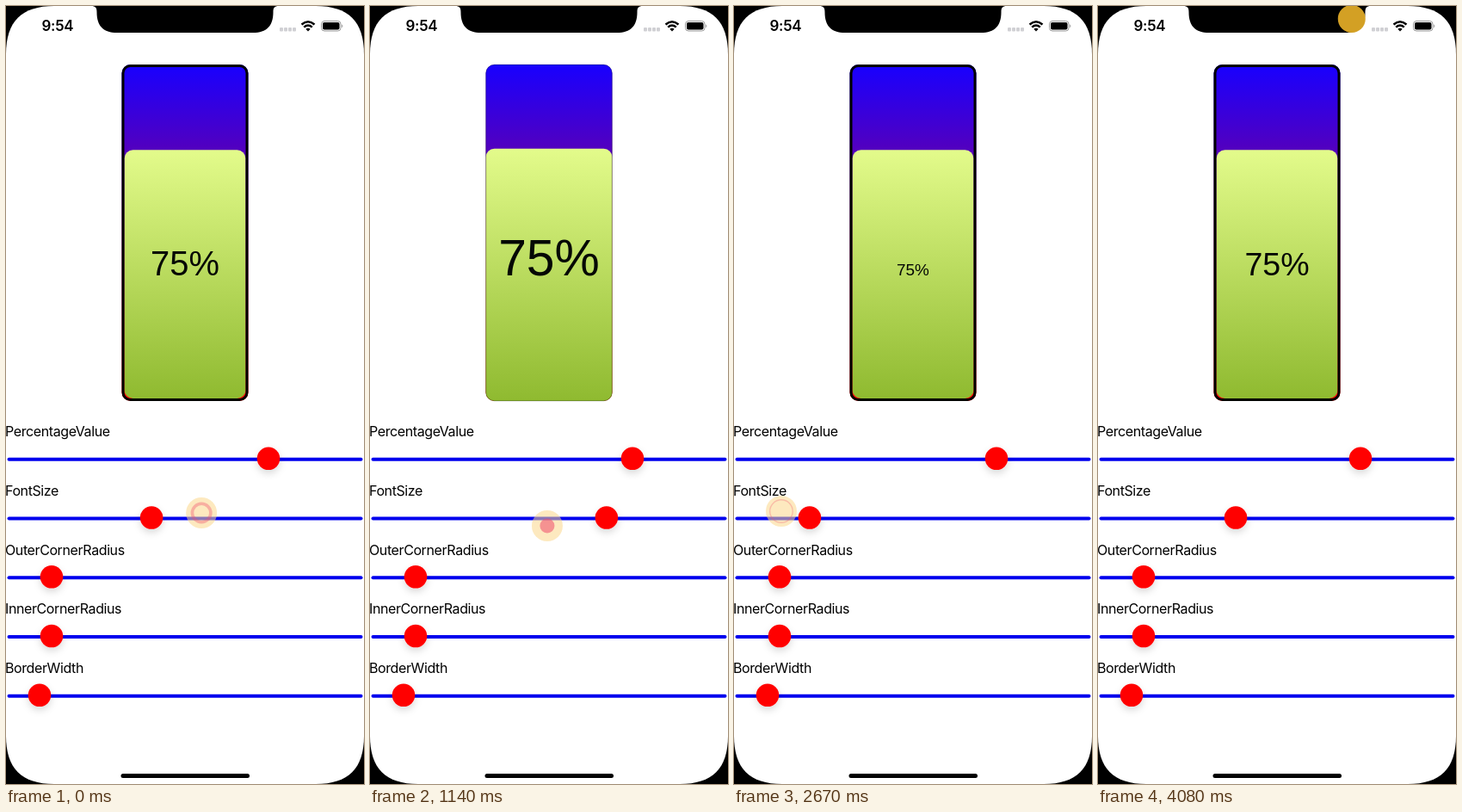
An HTML page that plays this animation: 416 by 904 pixels, repeating every 4.11 s.

```html
<!DOCTYPE html>
<html lang="en">
<head>
<meta charset="utf-8">
<title>Percentage view</title>
<style>
  html, body { margin: 0; width: 100%; height: 100%; overflow: hidden; background: #000; }
  svg { display: block; width: 100vw; height: 100vh; }
  .label { font: 16px Inter, sans-serif; letter-spacing: -.4px; }
  .clock { font: 600 17px Inter, sans-serif; letter-spacing: -.3px; }
  #value { font-family: "Liberation Sans", Arial, sans-serif; text-anchor: middle; fill: #050805; }
</style>
</head>
<body>
<svg viewBox="0 0 416 904" preserveAspectRatio="none">
  <defs>
    <linearGradient id="back" x1="0" y1="0" x2="0" y2="1">
      <stop stop-color="#1800ff"/><stop offset="1" stop-color="#f00"/>
    </linearGradient>
    <linearGradient id="front" x1="0" y1="0" x2="0" y2="1">
      <stop stop-color="#e3fb8b"/><stop offset="1" stop-color="#8fba30"/>
    </linearGradient>
    <filter id="shadow" x="-60%" y="-60%" width="220%" height="240%">
      <feDropShadow dx="0" dy="4" stdDeviation="4" flood-color="#000" flood-opacity=".15"/>
    </filter>
  </defs>

  <rect width="416" height="904"/>
  <path fill="#fff" d="M56 0H360C398 0 416 18 416 56V848C416 886 398 904 360 904H56C18 904 0 886 0 848V56C0 18 18 0 56 0Z"/>
  <path d="M99 0C104 0 105.500 2 105.500 7C105.500 23 113 31 129 31H287C303 31 310.500 23 310.500 7C310.500 2 312 0 317 0Z"/>
  <rect x="133.500" y="892" width="149.500" height="5" rx="2.500"/>

  <text class="clock" x="41.500" y="29">9:54</text>
  <g fill="#d0d0d4">
    <rect x="318" y="25" width="4" height="4.500" rx="1"/>
    <rect x="323" y="25" width="4" height="4.500" rx="1"/>
    <rect x="328" y="25" width="4" height="4.500" rx="1"/>
    <rect x="333" y="25" width="4" height="4.500" rx="1"/>
  </g>
  <g fill="none" stroke="#000" stroke-width="2.400">
    <path d="M343.500 21.500Q351 14.800 358.500 21.500"/>
    <path d="M346.200 24.600Q351 20.400 355.800 24.600"/>
  </g>
  <path d="M348.300 26.800Q351 24.600 353.700 26.800L351 29.600Z"/>
  <rect x="366.500" y="17.500" width="22.500" height="11.500" rx="3.500" fill="none" stroke="#999"/>
  <rect x="368" y="19" width="19.500" height="8.500" rx="2"/>
  <path d="M390.300 21.300Q392.300 23.200 390.300 25.200Z" fill="#888"/>

  <rect x="134.500" y="68" width="147" height="391" rx="10" fill="url(#back)"/>
  <rect id="level" rx="10" fill="url(#front)"/>
  <rect id="border" fill="none" stroke="#000"/>
  <text id="value" x="208" y="312.500">75%</text>

  <g id="sliders"></g>

  <g id="touch">
    <circle id="halo" r="18"/>
    <circle id="ripple" fill="none" stroke="#f0506e"/>
  </g>
</svg>
<script>
const LOOP = 4110, LAG = 465;
const RECT = { x: 134.5, y: 68, w: 147, h: 391 };
const $ = id => document.getElementById(id);
const set = (el, attrs) => { for (const k in attrs) el.setAttribute(k, attrs[k]); };
const add = (parent, tag, attrs) => {
  const el = document.createElementNS("http://www.w3.org/2000/svg", tag);
  set(el, attrs);
  return parent.appendChild(el);
};

const thumbs = [
  ["PercentageValue", 305], ["FontSize", 169], ["OuterCornerRadius", 53],
  ["InnerCornerRadius", 53], ["BorderWidth", 39]
].map(([name, x], i) => {
  const y = 526.8 + i * 68.75, g = $("sliders");
  add(g, "text", { class: "label", x: -1, y: y - 26.6 }).textContent = name;
  add(g, "rect", { x: 1.5, y: y - 2, width: 413, height: 4, rx: 2, fill: "#0000ee" });
  return add(g, "circle", { cx: x, cy: y - 1, r: 13.3, fill: "#f00", filter: "url(#shadow)" });
});

// Finger path: time, x, y. The font slider follows its x with a fixed lag.
const path = [
  [-465, 169, 589], [-45, 219, 589], [0, 227, 589], [420, 281, 597], [545, 292, 599],
  [675, 275, 601], [1140, 206, 604], [1575, 185, 594], [2040, 98, 581], [2205, 88, 582],
  [2670, 55, 587], [2760, 52, 588], [3225, 138, 592], [3615, 160, 594], [3690, 162, 594],
  [3750, 190, 575], [3840, 335, 350], [3930, 365, 195], [4080, 295, 15], [4110, 290, 13]
];

// Monotone cubic interpolation: extrema stay at the keys.
const rise = (i, c) => (path[i + 1][c] - path[i][c]) / (path[i + 1][0] - path[i][0]);
function slope(i, c) {
  if (i === 0) return rise(0, c);
  if (i === path.length - 1) return rise(i - 1, c);
  const a = rise(i - 1, c), b = rise(i, c);
  return a * b <= 0 ? 0 : 2 * a * b / (a + b);
}
function track(t, c) {
  let i = 0;
  while (i < path.length - 2 && t >= path[i + 1][0]) i++;
  const h = path[i + 1][0] - path[i][0], u = (t - path[i][0]) / h, v = 1 - u;
  return v * v * (1 + 2 * u) * path[i][c] + u * u * (3 - 2 * u) * path[i + 1][c]
    + h * u * v * (v * slope(i, c) - u * slope(i + 1, c));
}

function drawGauge(size) {
  const maxSize = RECT.w * .8 / 2;
  const fits = size <= maxSize;
  const inset = fits ? 3 : 0, line = fits ? 3 : .5;
  const h = (RECT.h - 2 * inset) * .75;
  set($("level"), {
    x: RECT.x + inset, y: RECT.y + RECT.h - inset - h, width: RECT.w - 2 * inset, height: h
  });
  set($("border"), {
    x: RECT.x + line / 2, y: RECT.y + line / 2, width: RECT.w - line, height: RECT.h - line,
    rx: 10 - line / 2, "stroke-width": line, "stroke-opacity": fits ? 1 : .6
  });
  set($("value"), { "font-size": Math.min(size, maxSize) });
}

function drawTouch(t) {
  const x = track(t, 1), y = track(t, 2), onNotch = y < 45;
  set($("touch"), { transform: `translate(${x} ${y})` });
  set($("halo"), {
    r: onNotch ? 16 : 18, fill: onNotch ? "#d3a024" : "#fcd88a", "fill-opacity": onNotch ? 1 : .55
  });
  const u = (t / 240 + .4) % 1;
  const outer = 18 * u ** .4;
  const width = outer * (1 - Math.min(.9, Math.max(0, (u - .15) * 2.8)));
  set($("ripple"), {
    r: outer - width / 2, "stroke-width": width,
    "stroke-opacity": onNotch ? 0 : .1 + .6 * (1 - u) ** 1.5
  });
}

function render(t) {
  const x = track(t - LAG, 1);
  set(thumbs[1], { cx: x });
  drawGauge((x - 15) / 3.86);
  drawTouch(t);
}

const start = performance.now();
function tick() {
  render((performance.now() - start) % LOOP);
  requestAnimationFrame(tick);
}
render(0);
requestAnimationFrame(tick);
</script>
</body>
</html>
```
